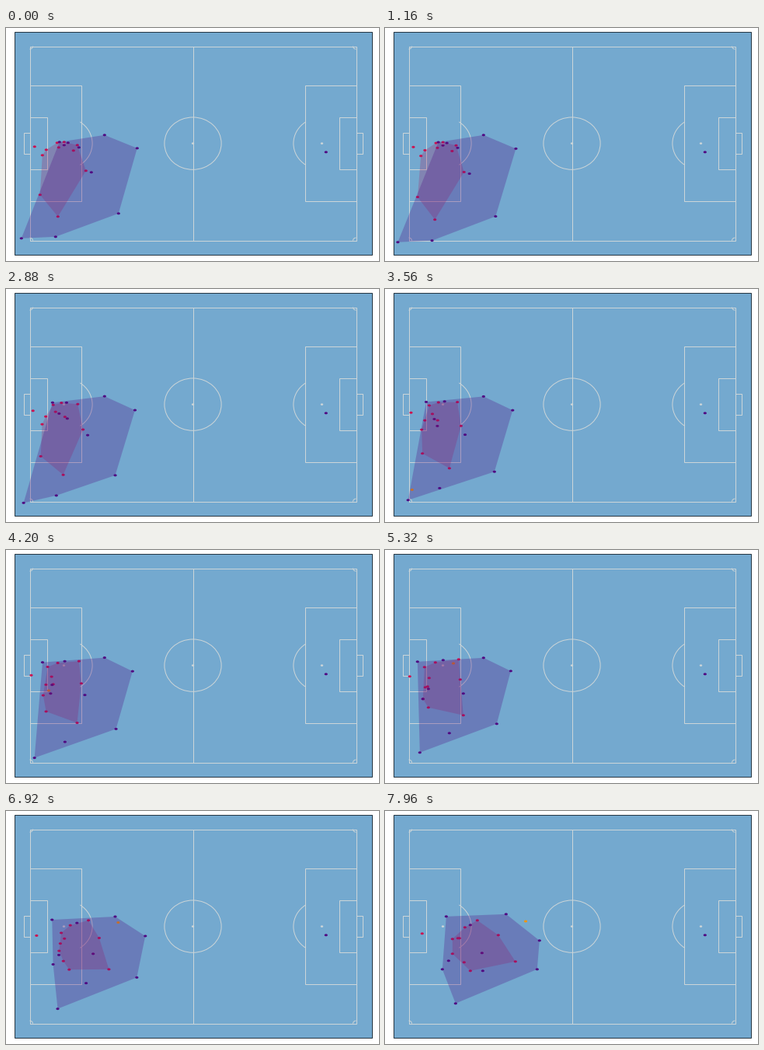
Animation of 480 by 300 pixels, one loop 8 s. Source, as a matplotlib script:

```python
import numpy as np
import matplotlib.pyplot as plt
from matplotlib.animation import FuncAnimation
from matplotlib.collections import EllipseCollection
from matplotlib.patches import Arc, Ellipse, Polygon, Rectangle

W, H, DPI = 480, 300, 100
STEP, FRAMES = 40, 200
PX = 72 / DPI  # one pixel in points

# Pitch in metres, with the pixel position and scale of its top left corner
LENGTH, WIDTH = 105, 68
X0, Y0, SX, SY = 30.5, 23.5, 4.0, 3.68

GRASS, LINE, BORDER = "#74a9cf", "#ccd5d8", "#263642"
PURPLE, RED, BALL = "#500a82", "#cd1250", "#f0960f"
RED_AREA = "#a8185c"

# Each player: place before the corner, after it, and at the end of the attack.
# The goalkeeper comes last.
SET_UP, CLEARED, END = 1400, 5320, 7960
ATTACK = [
    [(69, 147), (42, 144), (79, 136)],
    [(75, 151), (56, 179), (82, 193)],
    [(94, 154), (49, 192), (74, 204)],
    [(80, 148), (75, 142), (110, 147)],
    [(110, 186), (101, 185), (125, 183)],
    [(64, 269), (83, 236), (126, 206)],
    [(20, 271), (45, 261), (91, 248)],
    [(145, 239), (144, 224), (196, 204)],
    [(169, 155), (162, 156), (199, 167)],
    [(127, 138), (127, 139), (156, 133)],
    [(412, 160)] * 3,
]
DEFENCE = [
    [(47, 164), (49, 192), (102, 195)],
    [(52, 157), (52, 177), (87, 184)],
    [(44, 215), (56, 203), (110, 206)],
    [(67, 243), (101, 213), (168, 194)],
    [(103, 184), (97, 167), (146, 160)],
    [(92, 151), (95, 141), (119, 141)],
    [(66, 148), (51, 151), (94, 164)],
    [(68, 154), (57, 165), (96, 164)],
    [(75, 147), (65, 145), (103, 150)],
    [(87, 158), (55, 176), (87, 165)],
    [(37, 153), (32, 163), (48, 158)],
]
BALL_T = [3440, 4200, CLEARED, END]
BALL_X, BALL_Y = [31, 55, 88, 181], [273, 181, 146, 142]


def positions(team, t):
    start, mid, end = np.array(team, float).transpose(1, 0, 2) - 0.2
    if t >= CLEARED:
        return mid + (end - mid) * ((t - CLEARED) / (END - CLEARED)) ** 1.5
    u = max(0, (t - SET_UP) / (CLEARED - SET_UP))
    pos = start + (mid - start) * u * u * (3 - 2 * u)
    # Players far from the goal mouth swing out wide and back
    depth = np.clip((start[:, 1:] - 140) / 100, 0, None)
    moving = np.any(start != end, axis=1, keepdims=True)
    return pos + moving * depth * np.array([-4, 6]) * np.sin(np.pi * t / CLEARED)


def hull(points):
    pts = sorted(map(tuple, points))

    def chain(seq):
        out = []
        for p in seq:
            while len(out) > 1:
                (ax, ay), (bx, by) = out[-2:]
                if (bx - ax) * (p[1] - ay) - (by - ay) * (p[0] - ax) > 0:
                    break
                out.pop()
            out.append(p)
        return out[:-1]

    return np.array(chain(pts) + chain(pts[::-1]))


fig = plt.figure(figsize=(W / DPI, H / DPI), dpi=DPI, facecolor="white")
ax = fig.add_axes([0, 0, 1, 1])
ax.set(xlim=(0, W), ylim=(H, 0))
ax.axis("off")


def px(x, y):
    return X0 + SX * x, Y0 + SY * y


def box(x, y, w, h, edge=LINE, fill="none"):
    ax.add_patch(Rectangle(px(x, y), w * SX, h * SY, fc=fill, ec=edge,
                           lw=PX, joinstyle="miter", zorder=1))


def arc(x, y, r, a0=0, a1=360):
    ax.add_patch(Arc(px(x, y), 2 * r * SX, 2 * r * SY, theta1=a0, theta2=a1,
                     color=LINE, lw=PX, zorder=1))


def draw_pitch():
    mid = WIDTH / 2
    box(-5, -5, LENGTH + 10, WIDTH + 10, BORDER, GRASS)
    box(0, 0, LENGTH, WIDTH)
    box(0, 0, LENGTH / 2, WIDTH)
    arc(LENGTH / 2, mid, 9.15)
    for depth, half in [(16.5, 20.16), (5.5, 9.16), (-2, 3.66)]:
        box(0, mid - half, depth, 2 * half)
        box(LENGTH, mid - half, -depth, 2 * half)
    bend = np.degrees(np.arccos(5.5 / 9.15))
    arc(11, mid, 9.15, -bend, bend)
    arc(LENGTH - 11, mid, 9.15, 180 - bend, 180 + bend)
    for i, (x, y) in enumerate([(0, 0), (LENGTH, 0), (LENGTH, WIDTH), (0, WIDTH)]):
        arc(x, y, 1, 90 * i, 90 * i + 90)
    for x in (11, LENGTH / 2, LENGTH - 11):
        ax.add_patch(Ellipse(px(x, mid), 3.4, 2.6, color=LINE, lw=0, zorder=1))


def dots(color):
    d = EllipseCollection([4.2], [3], [0], units="xy", offsets=np.zeros((1, 2)),
                          offset_transform=ax.transData, facecolors=color,
                          linewidths=0, zorder=3)
    ax.add_collection(d, autolim=False)
    return d


def area(color, alpha):
    p = Polygon([(0, 0), (1, 0), (0, 1)], fc=color, alpha=alpha, lw=0, zorder=4)
    ax.add_patch(p)
    return p


draw_pitch()
ball = dots(BALL)
sides = [(DEFENCE, dots(RED), area(RED_AREA, 0.25)),
         (ATTACK, dots(PURPLE), area(PURPLE, 0.28))]


def update(n):
    t = n * STEP
    for team, marks, shape in sides:
        pos = positions(team, t)
        marks.set_offsets(pos)
        shape.set_xy(hull(pos[:-1]))
    ball.set_visible(t >= BALL_T[0])
    ball.set_offsets([(np.interp(t, BALL_T, BALL_X), np.interp(t, BALL_T, BALL_Y))])


anim = FuncAnimation(fig, update, frames=FRAMES, interval=STEP, repeat=True, repeat_delay=0)
plt.show()
```
